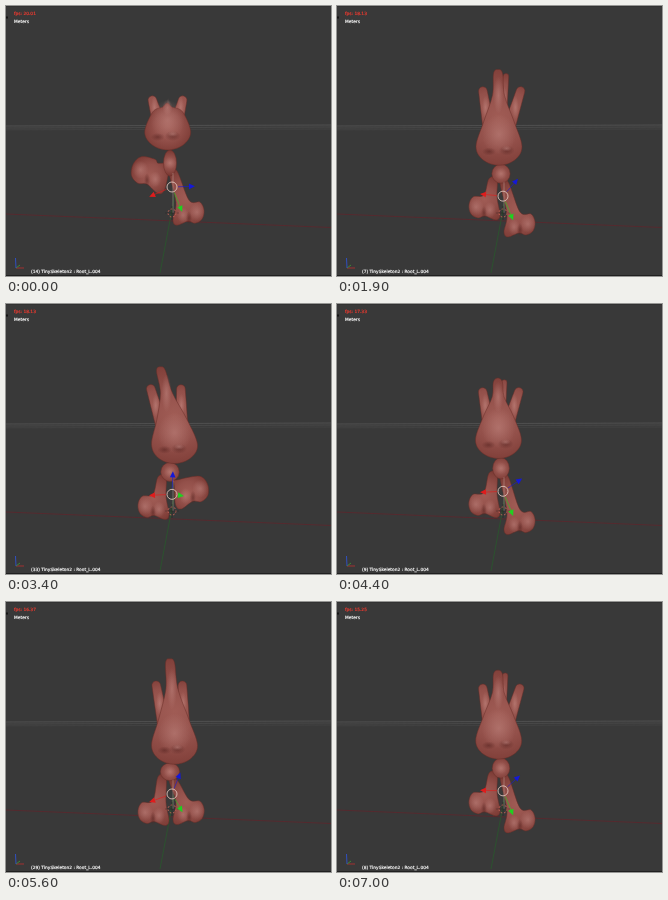
An HTML page with a canvas for the animation above (7100 ms loop, 325 px wide and 270 px high).

```html
<!DOCTYPE html>
<html lang="en">
<head>
<meta charset="utf-8">
<style>
html, body { margin: 0; width: 100%; height: 100%; overflow: hidden; background: #393939; }
canvas { display: block; }
</style>
</head>
<body>
<canvas id="stage" width="325" height="270"></canvas>
<script>
const ctx = document.getElementById('stage').getContext('2d');
const LOOP = 7100, STEP = 100, CYCLE = 40;

// Periodic building blocks of the walk: a bell around a moment, and a wave peaking there.
function bell(p, peak, width) {
  const d = (p - peak + 1.5 * CYCLE) % CYCLE - CYCLE / 2;
  return Math.exp(-d * d / (width * width));
}
const wave = (p, peak) => Math.cos((p - peak) / CYCLE * 2 * Math.PI);

function walk(p) {
  const squash = bell(p, 14, 5.8) + 0.25 * bell(p, 35, 5.8);
  return {
    squash,
    lean: -17 * bell(p, 36, 5.8),
    sway: wave(p, 11),
    yaw: wave(p, 4),
    roll: wave(p, 21),
    stepL: wave(p, 7),
    liftL: bell(p, 15.5, 3.2),
    liftR: bell(p, 35.5, 3.2),
    ballY: 171 - 14 * squash
  };
}

function line(x1, y1, x2, y2, color, width = 0.8) {
  ctx.strokeStyle = color;
  ctx.lineWidth = width;
  ctx.beginPath();
  ctx.moveTo(x1, y1);
  ctx.lineTo(x2, y2);
  ctx.stroke();
}

function text(str, x, y, color) {
  ctx.font = '4.36px "DejaVu Sans", sans-serif';
  ctx.fillStyle = ctx.strokeStyle = color;
  ctx.lineWidth = 0.2;
  ctx.fillText(str, x, y);
  ctx.strokeText(str, x, y);
}

// Fill the current path like soft clay with a darker rim.
function clay(x, y, r) {
  const g = ctx.createRadialGradient(x, y, 0, x, y, r);
  g.addColorStop(0, '#a05c55');
  g.addColorStop(0.5, '#93504a');
  g.addColorStop(1, '#7b3a34');
  ctx.fillStyle = g;
  ctx.fill();
  ctx.strokeStyle = 'rgba(105,45,40,.55)';
  ctx.lineWidth = 0.9;
  ctx.stroke();
}

function spot(x, y, rx, ry, rgb, alpha) {
  ctx.save();
  ctx.translate(x, y);
  ctx.scale(rx, ry);
  const g = ctx.createRadialGradient(0, 0, 0, 0, 0, 1);
  g.addColorStop(0, `rgba(${rgb},${alpha})`);
  g.addColorStop(1, `rgba(${rgb},0)`);
  ctx.fillStyle = g;
  ctx.fillRect(-1, -1, 2, 2);
  ctx.restore();
}
const shine = (x, y, rx, ry) => spot(x, y, rx, ry, '196,138,132', 0.5);
const shade = (x, y, rx, ry) => spot(x, y, rx, ry, '85,35,32', 0.55);

// Closed smooth outline through [x, y] points.
function blob(pts) {
  const n = pts.length, at = i => pts[(i + n) % n];
  ctx.beginPath();
  ctx.moveTo(...pts[0]);
  for (let i = 0; i < n; i++) {
    const [a, b, c, d] = [at(i - 1), at(i), at(i + 1), at(i + 2)];
    ctx.bezierCurveTo(b[0] + (c[0] - a[0]) / 6, b[1] + (c[1] - a[1]) / 6,
      c[0] - (d[0] - b[0]) / 6, c[1] - (d[1] - b[1]) / 6, c[0], c[1]);
  }
  const [lowX, lowY] = [0, 1].map(k => Math.min(...pts.map(q => q[k])));
  const [highX, highY] = [0, 1].map(k => Math.max(...pts.map(q => q[k])));
  clay((lowX + highX) / 2, (lowY + highY) / 2, Math.max(highX - lowX, highY - lowY) * 0.58);
}

// Round-ended stalk from its tip to a thicker base.
function stalk(x, y, bx, by, r) {
  const a = Math.atan2(by - y, bx - x), px = -Math.sin(a) * r, py = Math.cos(a) * r;
  ctx.beginPath();
  ctx.arc(x + Math.cos(a) * r, y + Math.sin(a) * r, r, a + Math.PI / 2, a - Math.PI / 2);
  ctx.lineTo(bx - px * 1.4, by - py * 1.4);
  ctx.lineTo(bx + px * 1.4, by + py * 1.4);
  ctx.closePath();
  clay((x + bx) / 2, (y + by) / 2, 28);
  shine((x + bx) / 2, (y + by) / 2, r * 0.8, 12);
}

// Leg and two-toed foot; side is -1 for left, 1 for right.
function foot(side, hipX, hipY, x, y, lift) {
  const c = Math.cos(0.45 * lift), s = Math.sin(0.45 * lift), size = 1 + 0.3 * lift;
  const local = (u, v) => [x + side * size * (u * c + v * s), y + size * (v * c - u * s)];
  blob([[hipX + side * 4, hipY], local(1, -12), local(12, -10), local(16, -2), local(14, 7),
    local(7, 11), local(0, 9), local(-11, 13), local(-15, 8), local(-12, -10), [hipX - side * 4, hipY]]);
  shine(...local(9, 0), 8, 9);
  shine(...local(-5, 3), 6, 8);
  shade(...local(1, 6), 3, 7);
}

function ring(x, y, r, color, dash = []) {
  ctx.setLineDash(dash);
  ctx.strokeStyle = color;
  ctx.lineWidth = 0.9;
  ctx.beginPath();
  ctx.arc(x, y, r, 0, 7);
  ctx.stroke();
  ctx.setLineDash([]);
}

function viewport() {
  ctx.fillStyle = '#393939';
  ctx.fillRect(0, 0, 325, 270);
  line(0, 120, 325, 119, '#565656');
  line(0, 122, 325, 121, '#4d4d4d');
  line(0, 123.8, 325, 123, '#444444');
  line(0, 208, 325, 221.5, '#5e262c');
  line(154, 267, 169, 188, '#29582d');
  line(0, 269.5, 325, 269.5, '#202020', 1);
  line(0, 0.3, 325, 0.3, '#2b2b2b', 0.6);
  line(0, 11.5, 2, 11.5, '#151515', 2);
  line(10, 262, 18, 262, '#a03030', 1);
  line(10, 262, 14, 259, '#3c8a34', 1);
  line(10, 262, 9.5, 252, '#3050c0', 1);
}

function head({ squash, lean, sway, yaw }) {
  const x = 165 - 3.7 * sway, wideY = 145 - 19 * squash, chin = 164 - 20 * squash;
  const neckX = x + lean * 0.2, neckY = 118 - 12 * squash;
  const tipX = x - 0.5 + lean, tipY = 53 + 44 * squash;
  const midX = (tipX + neckX) / 2, midY = (tipY + neckY) / 2;
  const earY = 78 + 12 * squash, earLean = 0.65 * lean;

  stalk(x + 1 + 7 * yaw + lean * 0.3, tipY + 17 - 16 * sway, neckX + 4 * yaw, neckY + 2, 2.8);
  stalk(x - 16.5 + earLean, earY, neckX - 10, neckY + 7, 4.3);
  stalk(x + 16 + 8 * yaw + earLean, earY, neckX + 10, neckY + 7, 4.3);

  const half = side => [[tipX + side * 4.5, tipY + 4], [midX + side * 6, midY], [neckX + side * 15, neckY],
    [x + side * 23, wideY], [x + side * 15.5, chin - 5]];
  blob([[tipX, tipY], ...half(1), [x, chin], ...half(-1).reverse()]);
  shine(midX, midY, 5, 22 - 14 * squash);
  shine(x, wideY - 12, 17, 20);

  // snout and eye bumps
  const eyeX = x + 5 + 3 * yaw, eyeY = wideY + 3;
  shade(x - 10, eyeY + 2, 7, 4);
  shade(eyeX, eyeY + 1, 8, 5);
  shine(eyeX, eyeY - 1, 5, 3);
}

function character(p) {
  const w = walk(p), { liftL, liftR, ballY, squash } = w;
  foot(-1, 156, ballY + 5 - 6 * liftL, 148 - 4 * liftL, 206 - 5 * w.stepL - 45 * liftL - 12 * liftR, liftL);
  foot(1, 167, ballY + 8, 182 + 4 * liftR, 214 + 4 * w.stepL - 45 * liftR - 12 * liftL, liftR);
  ctx.beginPath();
  ctx.ellipse(164, ballY, 10 - 3.5 * squash, 8.5 + 4.5 * squash, 0, 0, 7);
  clay(164, ballY, 12);
  shine(164, ballY, 6, 6);
  head(w);
  manipulator(w);
}

function manipulator({ squash, lean, roll }) {
  const x = 166, y = 193 - 12 * squash;
  const blue = (-62 + 60 * squash + 3 * lean) * Math.PI / 180;
  const arrow = (dx, dy, color) => {
    const a = Math.atan2(dy, dx), c = Math.cos(a), s = Math.sin(a), tx = x + dx, ty = y + dy;
    line(x + c * 6, y + s * 6, tx, ty, color, 0.6);
    ctx.fillStyle = color;
    ctx.beginPath();
    ctx.moveTo(tx + c * 3, ty + s * 3);
    ctx.lineTo(tx - c * 3 - s * 2.8, ty - s * 3 + c * 2.8);
    ctx.lineTo(tx - c * 3 + s * 2.8, ty - s * 3 - c * 2.8);
    ctx.fill();
  };
  line(x + 1, y - 14, x + 1, 207, 'rgba(215,190,182,.55)', 0.7);
  ring(x, 207, 4, '#d46a5c', [1.7, 1.7]);
  line(159, 207, 173, 207, 'rgba(25,25,25,.5)', 0.6);
  line(x, 200, x, 214, 'rgba(25,25,25,.5)', 0.6);
  arrow(-20, 4 + 10 * roll, '#e01c1c');
  arrow(9, 22 + 1.6 * lean, '#20d020');
  arrow(20 * Math.cos(blue), 20 * Math.sin(blue), '#1418d8');
  ring(x, y, 5, '#e0c3ba');
}

function draw(now) {
  const t = Math.floor(now % LOOP / STEP) * STEP;
  // Playback drags towards the end of the loop.
  const frame = Math.floor(14 + 0.01744 * t - 8 * (t / 7000) ** 5) % CYCLE;
  const fps = 18.13 + Math.max(0, 1.88 * (1 - t / 400)) - 0.0008 * Math.max(0, t - 3400);

  viewport();
  character(frame);
  text('fps: ' + fps.toFixed(2), 8, 8.7, '#e83a30');
  text('Meters', 8, 17, '#f4f4f4');
  text(`(${frame || CYCLE}) TinySkeleton2 : Root_L.004`, 25, 267.2, '#f4f4f4');
}

const start = performance.now();
function tick() {
  draw(performance.now() - start);
  requestAnimationFrame(tick);
}
tick();
</script>
</body>
</html>
```
